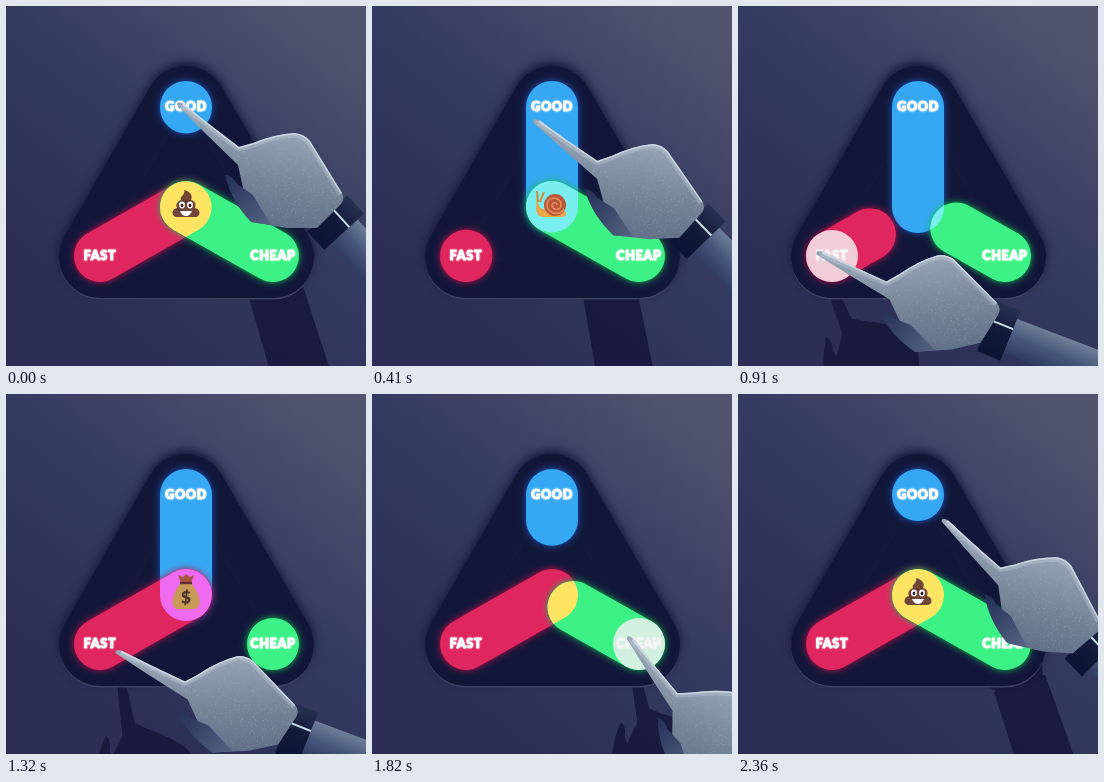
These frames come from a looping animation (360x360 px, 2400 ms). An HTML page with a canvas:

```html
<!DOCTYPE html>
<html lang="en">
<head>
<meta charset="utf-8">
<title>Good, fast, cheap</title>
<style>
  html, body { margin: 0; height: 100%; overflow: hidden; background: #343960; }
  canvas { display: block; width: 360px; height: 360px; }
</style>
</head>
<body>
<canvas id="stage" width="360" height="360"></canvas>
<script>
const ctx = document.getElementById('stage').getContext('2d');
const LOOP = 2400, PHASE = 800, R = 26, HUB = [180, 201];
const WRIST = [149, 111], ELBOW = [525, 432];

const buttons = [
  { label: 'GOOD', at: [180, 101], color: '#36a8f3', glow: '#1556c0' },
  { label: 'FAST', at: [94, 250], color: '#e0265f', glow: '#c00d48' },
  { label: 'CHEAP', at: [267, 250], color: '#3cf286', glow: '#10b950' }
];
// Light where two bars cross: good+fast, fast+cheap, cheap+good
const mixes = ['#f06af0', '#fde563', '#78eeee'];

// time, fingertip x, y, hand rotation, extra rotation of its shadow (degrees)
const keys = [
  [0, 173, 97, 0, 25],
  [120, 174, 99, 0, 25],
  [410, 163, 114, -3, 33],
  [640, 161, 165, -8, 41],
  [820, 84, 244, -13, 40],
  [910, 80, 246, -13, 40],
  [1320, 111, 257, -12, 52],
  [1480, 184, 254, 0, 40],
  [1620, 258, 243, 12, 25],
  [1820, 257, 243, 13, 25],
  [2120, 249, 217, 12, 25],
  [2240, 236, 180, 9, 25],
  [2360, 206, 126, 4, 25]
];

const clamp = v => Math.max(0, Math.min(1, v));
const radians = deg => deg * Math.PI / 180;
const keyAt = i => {
  const n = keys.length, k = keys[(i + n) % n];
  return [k[0] + Math.floor(i / n) * LOOP, ...k.slice(1)];
};

// Monotone cubic through the cyclic keys
function handPose(t) {
  let i = keys.length - 1;
  while (keys[i][0] > t) i--;
  const [a, b, c, d] = [-1, 0, 1, 2].map(o => keyAt(i + o));
  const h = c[0] - b[0], u = (t - b[0]) / h;
  const tangent = (s, r) => s * r > 0 ? 2 * s * r / (s + r) : 0;
  return [1, 2, 3, 4].map(j => {
    const slope = (p, q) => (q[j] - p[j]) / (q[0] - p[0]);
    const m0 = tangent(slope(a, b), slope(b, c)) * h;
    const m1 = tangent(slope(b, c), slope(c, d)) * h;
    const e = u * u * (3 - 2 * u);
    return b[j] * (1 - e) + c[j] * e + u * (1 - u) * (1 - u) * m0 - u * u * (1 - u) * m1;
  });
}

function capsule([x, y], reach) {
  const dx = HUB[0] - x, dy = HUB[1] - y, a = Math.atan2(dy, dx), q = Math.PI / 2;
  const p = new Path2D();
  p.arc(x, y, R, a + q, a + 3 * q);
  p.arc(x + dx * reach, y + dy * reach, R, a - q, a + q);
  p.closePath();
  return p;
}

function gradient(x0, y0, x1, y1, ...colors) {
  const g = ctx.createLinearGradient(x0, y0, x1, y1);
  colors.forEach((c, i) => g.addColorStop(i / (colors.length - 1), c));
  return g;
}

function fill(path, color) {
  ctx.fillStyle = color;
  ctx.fill(typeof path === 'string' ? new Path2D(path) : path);
}

function stroke(path, color, width) {
  ctx.strokeStyle = color;
  ctx.lineWidth = width;
  ctx.stroke(new Path2D(path));
}

function ellipse(x, y, rx, ry, color) {
  ctx.beginPath();
  ctx.ellipse(x, y, rx, ry, 0, 0, 7);
  ctx.fillStyle = color;
  ctx.fill();
}

const wall = gradient(70, 290, 300, 0, '#2b2f56', '#353a60', '#4f546f');
const triangle = 'M180 101L94 251H267Z';

function drawPanel() {
  ctx.save();
  ctx.lineJoin = 'round';
  ctx.translate(0, 1.5);
  stroke(triangle, '#454a6b', 82);
  ctx.translate(0, -1.5);
  ctx.shadowColor = '#141838';
  ctx.shadowBlur = 10;
  ctx.shadowOffsetY = -4;
  stroke(triangle, '#111639', 82);
  fill(triangle, '#111639');
  ctx.restore();
}

const emoji = [
  function snail() {
    fill('M-15 -9Q-14 4 -9 4L13 6Q16 10 11 12H-10Q-16 11 -16 2Z', '#e9a94b');
    stroke('M-14 -3L-15 -14M-12 -3L-8 -13', '#d98a36', 2);
    ellipse(3, 0, 11, 11, '#b9573a');
    stroke('M12 4C7 12 -6 8 -5 -1C-4 -9 9 -9 9 0C9 6 0 6 0 0C0 -3 5 -3 5 0', '#e58a58', 1.7);
  },
  function moneyBag() {
    fill('M-5 -10C-14 0 -17 15 -8 16H8C17 15 14 0 5 -10Z', '#c79a58');
    fill('M-8 -18L-3 -16L0 -19L4 -16L8 -18L5 -10H-5Z', '#a5573f');
    stroke('M-6 -10H6', '#652e34', 2.5);
    ctx.font = '900 17px Lato, sans-serif';
    ctx.fillStyle = '#4c3527';
    ctx.fillText('$', 0, 5);
  },
  function poop() {
    fill('M-2 -15C5 -13 7 -9 5 -5C10 -4 10 0 9 3C15 4 15 12 9 12H-9C-15 12 -15 4 -9 3C-11 -1 -8 -4 -5 -5C-7 -9 0 -10 -2 -15Z', '#704638');
    stroke('M-5 -4Q1 -2 5 -5M-9 4Q-5 6 -3 5', '#52312b', 1);
    for (const x of [-4, 4]) {
      ellipse(x, 0, 2.9, 3.4, '#fff');
      ellipse(x, 0.4, 1.4, 1.8, '#2d2020');
    }
    fill('M-6 6H6Q4 11 0 11Q-4 11 -6 6Z', '#fff');
  }
];

function drawLabels() {
  ctx.save();
  ctx.font = '900 12.5px Lato, sans-serif';
  ctx.letterSpacing = '0.7px';
  ctx.lineJoin = 'round';
  ctx.lineWidth = .9;
  ctx.fillStyle = ctx.strokeStyle = '#fff';
  ctx.shadowColor = 'rgba(255,255,255,.6)';
  ctx.shadowBlur = 2;
  for (const { label, at: [x, y] } of buttons) {
    ctx.fillText(label, x, y + .5);
    ctx.strokeText(label, x, y + .5);
  }
  ctx.restore();
}

function drawButtons(phase, p) {
  const e = 1 - (1 - clamp(p / 440)) ** 2;
  const reach = i => i === phase ? e : i === (phase + 1) % 3 ? 1 - e : 1;
  const bars = buttons.map((b, i) => capsule(b.at, reach(i)));

  buttons.forEach((b, i) => {
    ctx.save();
    ctx.shadowColor = b.glow;
    ctx.shadowBlur = 7;
    fill(bars[i], b.color);
    ctx.restore();
  });
  mixes.forEach((color, i) => {
    ctx.save();
    ctx.clip(bars[i]);
    fill(bars[(i + 1) % 3], color);
    ctx.restore();
  });

  ctx.textAlign = 'center';
  ctx.textBaseline = 'middle';
  const old = p < 60;
  const size = old ? 1 - clamp((p - 20) / 40) : clamp((p - 310) / 80);
  if (size > 0) {
    ctx.save();
    ctx.translate(180, 199);
    ctx.scale(size, size);
    emoji[(phase + (old ? 2 : 0)) % 3]();
    ctx.restore();
  }
  drawLabels();

  const flash = clamp((p - 15) / 45) * clamp((380 - p) / 150);
  if (flash > 0) {
    ctx.save();
    ctx.globalAlpha = flash * .82;
    ellipse(...buttons[phase].at, R, R, '#f4f2f4');
    ctx.restore();
  }
}

// Hand shapes, with the fingertip at the origin
const palm = new Path2D('M-2 2Q-2 -3 5 1L30 21L60 44L74 40Q96 31 116 30Q125 31 131 38L163 90Q166 96 162 101L138 125L108 125L72 119L66 94L59 62L27 31Z');
const thumb = new Path2D('M46 72Q53 72 58 81L74 92L92 122L72 119Q52 98 46 72Z');
const rim = 'M4 1L30 21L60 44L74 40Q96 31 116 30Q125 31 131 38L163 90';
const skin = gradient(105, 25, 85, 130, '#98a6b6', '#76879b', '#5b6c85');

// Arm shapes, with the wrist at the origin and the elbow along +x
const strap = new Path2D('M-1 -27H24V27H-1Z');
const arm = new Path2D('M20 -18L300 -24V24L20 18Z');
const armShadow = new Path2D('M-5 -28L300 -32V32L-5 26Z');

const grain = new Path2D();
let seed = 7;
const random = () => (seed = seed * 16807 % 2147483647) / 2147483647;
for (let i = 0; i < 900; i++) grain.rect(random() * 170, random() * 130, 1, 1);

// Bend of the forearm relative to the hand
function armBend([x, y, turn]) {
  const a = radians(turn), [wx, wy] = WRIST;
  const px = x + wx * Math.cos(a) - wy * Math.sin(a);
  const py = y + wx * Math.sin(a) + wy * Math.cos(a);
  return Math.atan2(ELBOW[1] - py, ELBOW[0] - px) - a;
}

function drawHand(pose) {
  const [x, y, turn] = pose;
  ctx.save();
  ctx.translate(x, y);
  ctx.rotate(radians(turn));

  ctx.save();
  ctx.translate(...WRIST);
  ctx.rotate(armBend(pose));
  fill(arm, gradient(0, -20, 0, 20, '#71829c', '#46567a', '#2d395f'));
  fill(strap, gradient(0, -27, 0, 27, '#26304f', '#111938', '#0d1433'));
  stroke('M0 -7H24', '#c5dde4', 2);
  ctx.restore();

  fill(palm, skin);
  ctx.save();
  ctx.clip(palm);
  fill(grain, 'rgba(205,218,230,.2)');
  ctx.lineJoin = 'round';
  stroke(rim, 'rgba(205,218,230,.3)', 9);
  stroke(rim, 'rgba(220,230,238,.7)', 3);
  ctx.restore();
  fill(thumb, gradient(46, 75, 90, 122, '#25305a', '#53637f'));
  ctx.restore();
}

function drawShadow(pose) {
  const [x, y, turn, swing] = pose;
  ctx.save();
  ctx.translate(x, y);
  ctx.rotate(radians(turn + swing));
  const shape = new Path2D(), bend = new DOMMatrix();
  bend.translateSelf(...WRIST).rotateSelf(armBend(pose) * 180 / Math.PI);
  shape.addPath(palm);
  shape.addPath(thumb);
  shape.addPath(armShadow, bend);
  fill(shape, 'rgba(18,21,55,.8)');
  ctx.restore();
}

function draw(now) {
  const t = now % LOOP, pose = handPose(t);
  ctx.fillStyle = wall;
  ctx.fillRect(0, 0, 360, 360);
  drawShadow(pose);
  drawPanel();
  drawButtons(Math.floor(t / PHASE), t % PHASE);
  drawHand(pose);
  requestAnimationFrame(() => draw(performance.now() - start));
}

const start = performance.now();
draw(0);
</script>
</body>
</html>
```
